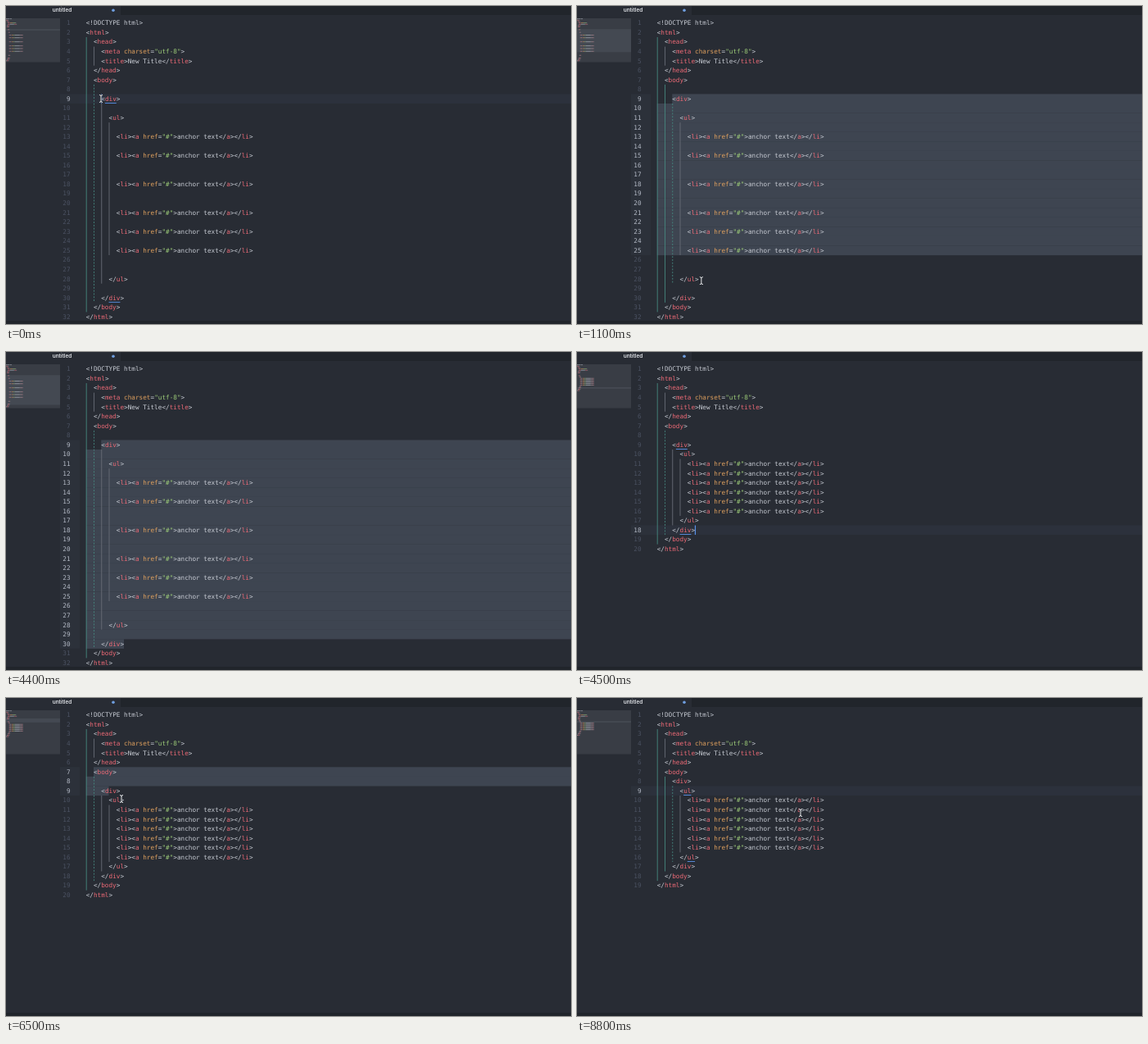
Write an HTML page with a canvas that moves like this. It is 690x388 px and loops after 8.9 s.

```html
<!DOCTYPE html>
<html lang="en">
<head>
<meta charset="utf-8">
<title>Joining lines in an editor</title>
<style>
  html, body { margin: 0; overflow: hidden; background: #282c34; }
  canvas { display: block; }
</style>
</head>
<body>
<canvas id="stage" width="690" height="388"></canvas>
<script>
const ctx = document.getElementById('stage').getContext('2d');
const LOOP = 8900, STEP = 100;
const LEFT = 97.7, TOP = 14.9, CHAR = 4.635, ROW = 11.565;
const MAP_ROW = 1.65, MAP_CHAR = 0.47;
const MONO = '7.7px "DejaVu Sans Mono", monospace';
const COLOR = {
  bg: '#282c34', bar: '#21252b', line: '#2c313c', select: '#3e4551',
  text: '#c8ccd4', number: '#4b5262', active: '#b4bac6',
  guide: '#686d77', stack: '#478880', accent: '#5a92e8'
};
const TOKEN = /((?<=<\/?)[a-z]+)|([a-z]+(?==))|("[^"]*")|(>[^<]*|[<\/]+|.)/g;
const TOKEN_COLORS = ['#ec6a76', '#dfa05e', '#9dcc79', COLOR.text];

const item = '        <li><a href="#">anchor text</a></li>';
const head = ['<!DOCTYPE html>', '<html>', '  <head>', '    <meta charset="utf-8">',
  '    <title>New Title</title>', '  </head>', '  <body>'];
const tail = ['    </div>', '  </body>', '</html>'];
const tidyList = ['    <div>', '      <ul>', ...Array(6).fill(item), '      </ul>', ...tail];
const blanks = n => Array(n).fill('');
const spaced = [...head, '', '    <div>', '', '      <ul>',
  ...[1, 1, 2, 2, 1, 1].flatMap(n => [...blanks(n), item]),
  '', '', '      </ul>', '      ', ...tail];
const joined = [...head, '', ...tidyList];
const compact = [...head, ...tidyList];

// Pointer path: time, x, y
const path = [
  [400, 116, 113], [800, 151, 309], [1200, 152, 340], [2300, 152, 340], [2700, 153, 355],
  [4700, 153, 355], [5500, 107, 90], [6020, 107, 90], [6500, 141, 123], [6800, 144, 125],
  [7100, 280, 140], [8600, 280, 140], [8800, 273, 140]
];

function pointerAt(t) {
  const i = path.findIndex(key => key[0] >= t);
  if (i < 1) return path[i < 0 ? path.length - 1 : 0].slice(1);
  const [t0, x0, y0] = path[i - 1], [t1, x1, y1] = path[i];
  const u = (t - t0) / (t1 - t0), k = u * u * (3 - 2 * u);
  return [x0 + (x1 - x0) * k, y0 + (y1 - y0) * k];
}

// The selection trails the pointer slightly.
function dragHead(t, lines) {
  const [x, y] = pointerAt(Math.min(t - 225, 6800));
  const row = Math.floor((y - TOP) / ROW) + 1;
  return [row, Math.min(Math.round((x - LEFT) / CHAR), lines[row - 1].length)];
}

function stateAt(t) {
  if (t < 4500) return { lines: spaced, since: 0, anchor: [9, 4], caret: dragHead(t, spaced) };
  if (t < 5900) return { lines: joined, since: 4500, anchor: [18, 10], caret: [18, 10] };
  if (t < 8200) return { lines: joined, since: 5900, anchor: [7, 2], caret: dragHead(t, joined) };
  return { lines: compact, since: 8200, anchor: [9, 10], caret: [9, 10] };
}

const colX = col => LEFT + col * CHAR;
const rowY = row => TOP + (row - 1) * ROW;
const indent = line => line.search(/\S/);

function rect(x, y, w, h, color) {
  ctx.fillStyle = color;
  ctx.fillRect(x, y, w, h);
}

function text(str, x, y, color, font = MONO, align = 'left') {
  ctx.font = font;
  ctx.textAlign = align;
  ctx.fillStyle = color;
  ctx.fillText(str, x, y);
}

function drawChrome() {
  rect(0, 0, 690, 388, COLOR.bg);
  rect(140, 0, 550, 11, COLOR.bar);
  text('untitled', 68.5, 7.3, '#e0e3e8', '600 6.4px Inter, sans-serif', 'center');
  ctx.fillStyle = '#6f9fe0';
  ctx.beginPath();
  ctx.arc(131, 5.3, 1.8, 0, 7);
  ctx.fill();
}

function drawSelection(anchor, caret) {
  const [last, end] = caret;
  for (let row = anchor[0]; row <= last; row++) {
    const x = colX(row === anchor[0] ? anchor[1] : 0);
    rect(x, rowY(row), (row === last ? colX(end) : 690) - x, ROW + 0.1, COLOR.select);
  }
}

function drawGuides(lines, caretRow) {
  const depths = lines.map((_, i) => indent(lines.slice(i).find(l => l.trim())) / 2);
  const caretDepth = depths[caretRow - 1];
  for (let level = 0; level < 4; level++) {
    for (let i = 0; i < depths.length; i++) {
      if (depths[i] <= level) continue;
      const from = i;
      while (depths[i] > level) i++;
      const onStack = caretRow > from && caretRow <= i && level < caretDepth;
      ctx.strokeStyle = onStack ? COLOR.stack : COLOR.guide;
      ctx.setLineDash(onStack && level === caretDepth - 1 ? [2, 1.8] : []);
      ctx.lineWidth = 0.9;
      ctx.beginPath();
      ctx.moveTo(colX(level * 2) + 0.5, rowY(from + 1));
      ctx.lineTo(colX(level * 2) + 0.5, rowY(i + 1));
      ctx.stroke();
    }
  }
  ctx.setLineDash([]);
}

function drawCode(lines, isActive) {
  lines.forEach((line, i) => {
    const base = rowY(i + 1) + 8.4;
    text(i + 1, 78.6, base, isActive(i + 1) ? COLOR.active : COLOR.number, MONO, 'right');
    for (const m of line.matchAll(TOKEN)) {
      if (!m[0].trim()) continue;
      const color = TOKEN_COLORS[m.slice(1).findIndex(Boolean)];
      text(m[0], colX(m.index), base, color);
      ctx.globalAlpha = 0.6;
      rect(m.index * MAP_CHAR, 15.2 + i * MAP_ROW, m[0].length * MAP_CHAR, 0.9, color);
      ctx.globalAlpha = 1;
    }
  });
}

function underlineTags(lines, row) {
  const line = lines[row - 1], depth = indent(line);
  const name = line.match(/<\/?([a-z]+)/)[1];
  lines.forEach((other, i) => {
    const tag = other.match(/<\/?([a-z]+)/);
    if (!tag || tag[1] !== name || indent(other) !== depth) return;
    const start = depth + tag[0].length - name.length;
    rect(colX(start), rowY(i + 1) + 10.6, name.length * CHAR, 0.9, COLOR.accent);
  });
}

function drawPointer([x, y]) {
  ctx.beginPath();
  ctx.moveTo(x - 2, y - 4.5);
  ctx.quadraticCurveTo(x, y - 4.5, x, y - 3);
  ctx.lineTo(x, y + 3);
  ctx.quadraticCurveTo(x, y + 4.5, x - 2, y + 4.5);
  ctx.moveTo(x + 2, y - 4.5);
  ctx.quadraticCurveTo(x, y - 4.5, x, y - 3);
  ctx.moveTo(x, y + 3);
  ctx.quadraticCurveTo(x, y + 4.5, x + 2, y + 4.5);
  for (const [width, color] of [[2, '#20242b'], [1, '#f0f2f5']]) {
    ctx.lineWidth = width;
    ctx.strokeStyle = color;
    ctx.stroke();
  }
}

function draw(t) {
  const { lines, since, anchor, caret } = stateAt(t);
  const empty = anchor[0] === caret[0] && anchor[1] === caret[1];
  const first = anchor[0], last = !empty && caret[1] === 0 ? caret[0] - 1 : caret[0];
  const rows = last - first + 1;

  drawChrome();
  rect(66, rowY(first), 24, rows * ROW, '#2c313a');
  if (empty) rect(90, rowY(first), 600, ROW, COLOR.line);
  else drawSelection(anchor, caret);

  rect(0, 15, 66, 53.5, '#393d45');
  rect(0, 15 + (first - 1) * MAP_ROW, 66, rows * MAP_ROW, empty ? '#464b54' : '#444952');

  drawGuides(lines, caret[0]);
  drawCode(lines, row => row >= first && row <= last);
  if (empty) {
    underlineTags(lines, caret[0]);
    if ((t - since) % 800 < 400) rect(colX(caret[1]) - 0.2, rowY(caret[0]), 1.2, ROW, COLOR.accent);
  }
  rect(0, 384, 690, 4, COLOR.bar);

  const hidden = (t >= 3300 && t < 4700) || (t >= 7300 && t < 8600);
  if (!hidden) drawPointer(pointerAt(t));
}

function tick() {
  const t = performance.now() % LOOP;
  draw(Math.floor(t / STEP) * STEP);
  requestAnimationFrame(tick);
}
tick();
</script>
</body>
</html>
```
